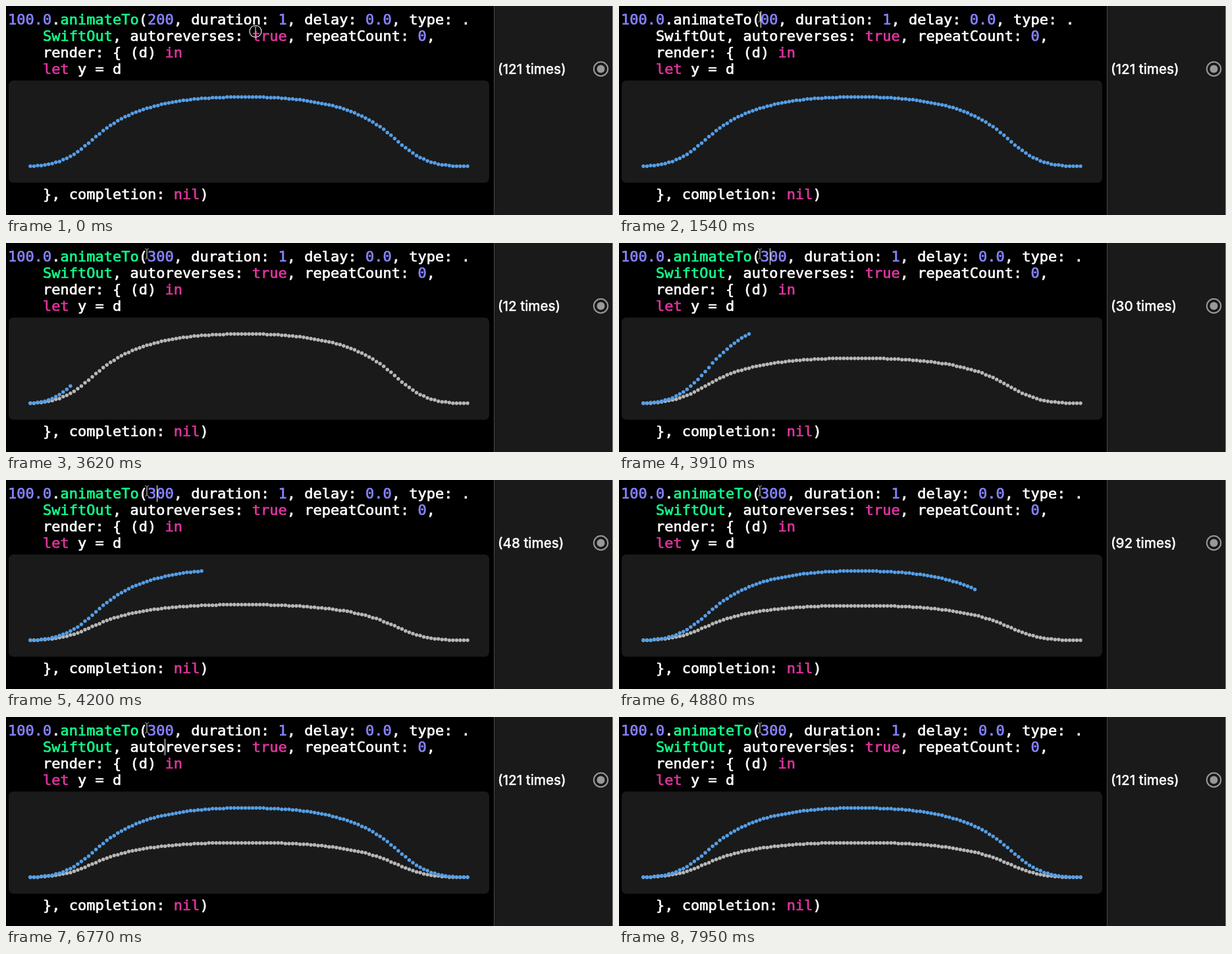
An HTML page with a canvas that plays this animation: 922 px wide and 317 px high, repeating every 8 s.

```html
<!DOCTYPE html>
<html>
<head>
<meta charset="utf-8">
<style>
html, body { margin: 0; width: 100%; height: 100%; overflow: hidden; background: #000; }
canvas { display: block; }
</style>
</head>
<body>
<canvas id="stage" width="922" height="317"></canvas>
<script>
const ctx = document.getElementById('stage').getContext('2d');
const LOOP = 8000, LEFT = 3, ADVANCE = 13.245;
const WHITE = '#fff', PINK = '#e0359f', GREEN = '#10ff8c', PURPLE = '#8783ff';
const BLUE = '#559fe8', GRAY = '#b8b8b8', PANEL = '#1a1a1a';
const clamp = (v, lo, hi) => Math.min(hi, Math.max(lo, v));
const between = (t, a, b) => t >= a && t < b;

// Cubic Bezier easing (0.4, 0, 0.2, 1), solved by bisection
function swiftOut(x) {
  let lo = 0, hi = 1, s = 0.5;
  for (let k = 0; k < 24; k++) {
    s = (lo + hi) / 2;
    const bx = 1.2 * s * (1 - s) ** 2 + 0.6 * s * s * (1 - s) + s ** 3;
    if (bx < x) lo = s; else hi = s;
  }
  return s * s * (3 - 2 * s);
}

const samples = (peak, height) => Array.from({ length: 121 }, (_, i) =>
  height * swiftOut(clamp(1 - Math.abs(i - peak) / 60, 0, 1)));
const firstRun = samples(58.7, 1);
const secondRun = samples(59.3, 2);

function disc(x, y, r, color) {
  ctx.fillStyle = color;
  ctx.beginPath();
  ctx.arc(x, y, r, 0, 7);
  ctx.fill();
}

function ring(x, y, r, width, color) {
  ctx.strokeStyle = color;
  ctx.lineWidth = width;
  ctx.beginPath();
  ctx.arc(x, y, r, 0, 7);
  ctx.stroke();
}

// Text with a thin outline, for a weight between regular and bold
function heavyText(text, x, y, color, outline) {
  ctx.fillStyle = ctx.strokeStyle = color;
  ctx.lineWidth = outline;
  ctx.lineJoin = 'round';
  ctx.fillText(text, x, y);
  ctx.strokeText(text, x, y);
}

// Draws [text, color] runs on the monospaced grid
function codeLine(col, baseline, runs) {
  ctx.font = '22px "DejaVu Sans Mono", monospace';
  for (const [text, color = WHITE] of runs) {
    heavyText(text, LEFT + col * ADVANCE, baseline, color, 0.7);
    col += text.length;
  }
}

function drawCode(t) {
  const target = t < 1540 ? '200' : t < 1650 ? '00' : '300';
  const name = between(t, 1540, 1770) ? WHITE : GREEN;
  codeLine(0, 28, [['100.0', PURPLE], ['.'], ['animateTo', name], ['('],
    [target, PURPLE], [', duration: '], ['1', PURPLE], [', delay: '],
    ['0.0', PURPLE], [', type: .']]);
  codeLine(4, 53, [['SwiftOut', name], [', autoreverses: '], ['true', PINK],
    [', repeatCount: '], ['0', PURPLE], [',']]);
  codeLine(4, 78, [['render: { (d) '], ['in', PINK]]);
  codeLine(4, 103, [['let', PINK], [' y = d']]);
  codeLine(4, 293, [['}, completion: '], ['nil', PINK], [')']]);
}

function plot(values, count, scale, color) {
  for (let i = 0; i < count; i++)
    disc(37 + i * 664 / 120, Math.round(243 - values[i] * scale), 2.75, color);
}

function sampleCount(t) {
  if (t < 3440) return 0;
  const n = t < 4200 ? 12 + (t - 3620) * 0.06207 : 48 + (t - 4200) * 0.0648;
  return clamp(Math.floor(n + 0.3), 1, 121);
}

function drawGraph(count, t) {
  ctx.fillStyle = PANEL;
  ctx.beginPath();
  ctx.roundRect(4, 113, 730, 155, 7);
  ctx.fill();
  const scale = 105 / Math.max(1, ...secondRun.slice(0, count));
  plot(firstRun, 121, scale, t < 2190 ? BLUE : GRAY);
  plot(secondRun, count, scale, BLUE);
}

function drawSidebar(count, t) {
  ctx.fillStyle = PANEL;
  ctx.fillRect(741, 0, 181, 317);
  ctx.fillStyle = '#484848';
  ctx.fillRect(741, 0, 1, 317);
  ctx.fillStyle = '#8f8f8f';
  ctx.fillRect(921, 0, 1, 317);
  if (between(t, 3330, 3440)) return;
  ctx.font = '500 20.5px Inter, sans-serif';
  const color = between(t, 2190, 3330) ? '#8c8c8c' : WHITE;
  heavyText(`(${t < 3330 ? 121 : count} times)`, 747, 103, color, 0.3);
  ring(903.5, 95.5, 10.7, 2, '#999');
  disc(903.5, 95.5, 6, '#999');
}

function drawCaret(t) {
  const blink = [580, 1180, 1540, 2250, 2790, 3330, 3880, 4430, 5000, 5450, 6050];
  if (blink.filter(at => at <= t).length % 2 === 0) return;
  const moves = [6410, 6770, 6950, 7130, 7250, 7360, 7540, 7950];
  const steps = moves.filter(at => at <= t).length;
  const col = 16 + steps;
  const x = steps ? Math.floor(LEFT + col * ADVANCE) : between(t, 1540, 1650) ? 215 : 229;
  ctx.fillStyle = WHITE;
  ctx.fillRect(x, steps ? 33 : 8, 1, 25);
}

function drawPointer(t) {
  const p = clamp((t - 30) / 500, 0, 1);
  const ease = p * p * (3 - 2 * p);
  const x = 379 - 165 * ease, y = 38.5 - 22 * ease;
  if (t < 580) ring(x, y, 9, 1.2, '#eee');
  ctx.strokeStyle = '#a0a0a0';
  ctx.lineWidth = 1;
  ctx.beginPath();
  for (const side of [-1, 1]) {
    ctx.moveTo(x + side * 3, y - 8);
    ctx.quadraticCurveTo(x, y - 8, x, y - 5);
    ctx.lineTo(x, y + 5);
    ctx.quadraticCurveTo(x, y + 8, x + side * 3, y + 8);
  }
  ctx.stroke();
}

function draw(now) {
  const t = now % LOOP;
  const count = sampleCount(t);
  ctx.fillStyle = '#000';
  ctx.fillRect(0, 0, 922, 317);
  drawSidebar(count, t);
  drawGraph(count, t);
  drawCode(t);
  drawCaret(t);
  drawPointer(t);
  requestAnimationFrame(draw);
}
requestAnimationFrame(draw);
</script>
</body>
</html>
```
